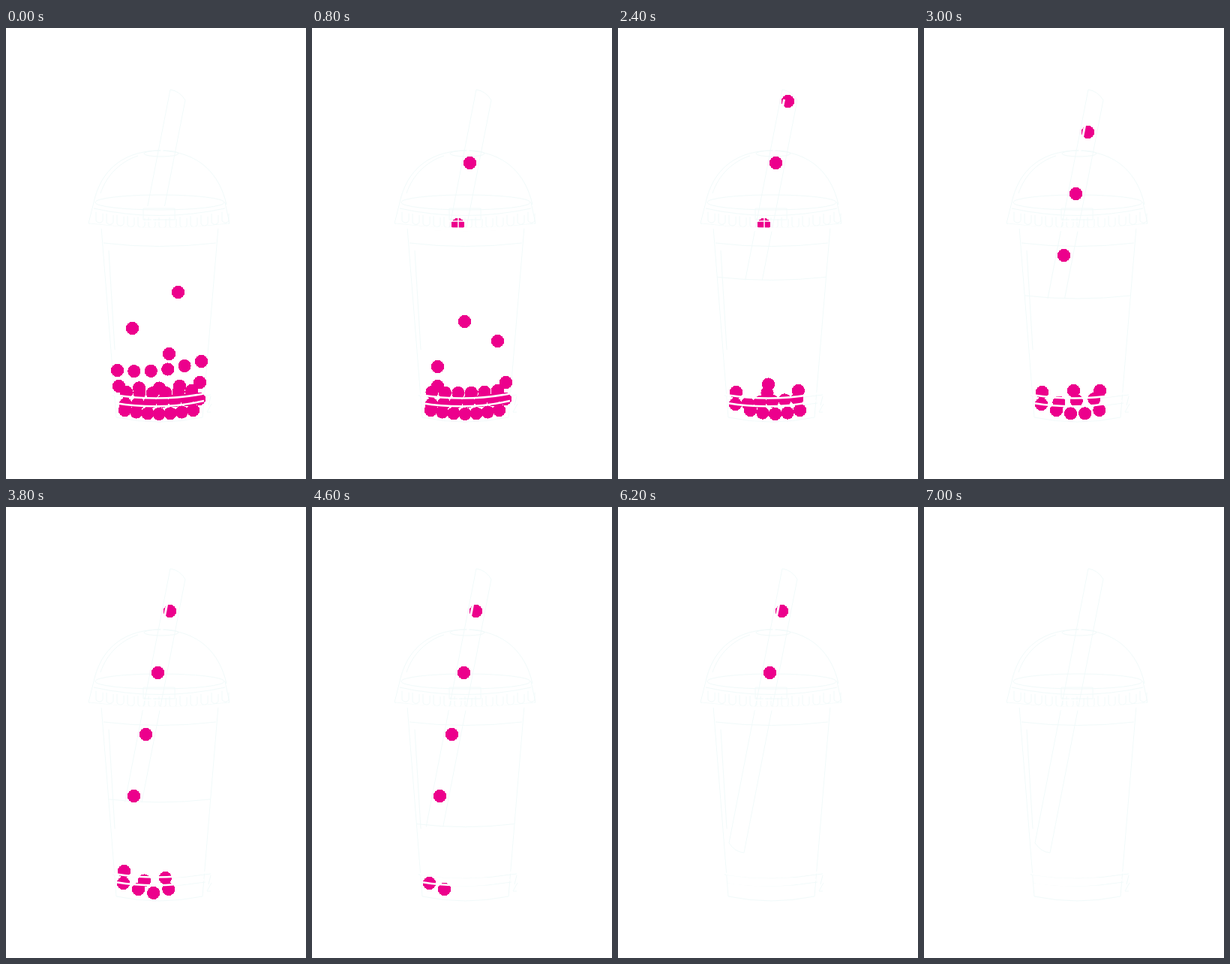
Write an HTML page that moves like this. It is 400 px wide and 600 px high and loops after 7.2 s.

```html
<!DOCTYPE html>
<html lang="en">
<head>
<meta charset="utf-8">
<title>Bubble tea</title>
<style>
  html, body { margin: 0; width: 100%; height: 100%; overflow: hidden; background: #fff; }
  svg { display: block; width: 400px; height: 600px; }
  .line { fill: none; stroke: #f1fafa; stroke-width: 1; }
  .gap { fill: none; stroke: #fff; stroke-width: 2.5; }
  .pearls { fill: #ec008c; shape-rendering: crispEdges; }
</style>
</head>
<body>
<svg viewBox="0 0 400 600">
  <clipPath id="above"><rect id="air" width="400" height="240"/></clipPath>

  <g class="line">
    <path clip-path="url(#above)" d="M219 82L148 447Q156 459 168 460L239 96Q232 84 219 82"/>
    <path id="surface"/>
    <path d="M117 232C125 195 150 164 204 163C258 164 285 195 294 235"/>
    <path d="M126 220C134 196 152 178 176 170"/>
    <ellipse cx="207" cy="167" rx="23" ry="4"/>
    <ellipse cx="205" cy="232" rx="86" ry="10"/>
    <path d="M117 232L110 260Q204 273 298 260L292 232"/>
    <path d="M117 240Q204 259 292 240M183 240H225V255H183Z"/>
    <path id="ridges"/>
    <path d="M127 265L147 518Q204 530 262 518L283 265"/>
    <path d="M130 286Q204 295 280 286M137 296L145 428"/>
    <path d="M142 489Q204 499 273 488M146 500Q204 509 266 499"/>
    <path d="M273 490L270 502M274 500L268 511H273"/>
  </g>

  <path id="pearls" class="pearls"/>

  <!-- gaps in front of the pearls -->
  <g class="gap">
    <path d="M221.5 95L207.5 165" stroke-width="3"/>
    <path d="M144 488Q207 498 266 486M146 499Q207 509 264 496"/>
    <path d="M195 252V266M184 257H205" stroke-width="1.5"/>
    <path d="M112 263Q204 273 296 263" stroke-width="5"/>
  </g>
</svg>

<script>
const LOOP = 7200, STEP = 200, R = 8.6, SIPS = 15;

// Rows of pearls, spread evenly from left to right. Each empties between
// two times, while its ends move in by the given amounts.
const rows = [
  { n: 7, left: 158, right: 249, y: 508, tilt: 0, sag: 5, from: 1200, to: 5000, inL: 18, inR: 70, bend: 2 },
  { n: 7, left: 159, right: 257, y: 500, tilt: -7, sag: 0, from: 1700, to: 4700, inL: -3, inR: 60, bend: 0.8 },
  { n: 6, left: 160, right: 247, y: 484, tilt: -2, sag: 2, from: 700, to: 3900, inL: -3, inR: 25, bend: 2 },
  { n: 5, left: 150, right: 258, y: 476, tilt: -5, sag: 5, from: 0, to: 1200, inL: 17, inR: 0, bend: 1 },
  { n: 6, left: 148, right: 260, y: 455, tilt: -12, sag: 6, from: 0, to: 700, inL: 0, inR: 0, bend: 1 }
];

// Loose pearls drift through these points.
const TIMES = [0, 800, 1800, 3000];
const loose = [
  [[229, 351], [203, 390], [201, 465], [199, 482]],
  [[168, 399], [167, 450]],
  [[217, 433], [247, 416]]
];

const $ = id => document.getElementById(id);
const mix = (a, b, u) => a + (b - a) * u;
const clamp = u => Math.min(1, Math.max(0, u));
const dot = (x, y) =>
  `M${x + 0.5 - R} ${y + 0.5}a${R} ${R} 0 1 1 ${2 * R} 0a${R} ${R} 0 1 1 ${-2 * R} 0z`;

$("ridges").setAttribute("d", Array.from({ length: 13 }, (_, i) => {
  const x = 120 + i * 14, y = 244 + 8 * (1 - ((x - 204) / 88) ** 2);
  return `M${x} ${y}v12q5 5 9 0v-10`;
}).join(""));

function drawRow(row, t) {
  const u = clamp((t - row.from) / (row.to - row.from));
  const count = Math.ceil(row.n * (1 - u));
  const left = row.left + row.inL * clamp(6 * u);
  const right = row.right - row.inR * u ** row.bend;
  let d = "";
  for (let i = 0; i < count; i++) {
    const v = i / Math.max(1, count - 1);
    d += dot(mix(left, right, v), row.y + row.tilt * v + row.sag * Math.sin(Math.PI * v));
  }
  return d;
}

function drawLoose(path, t) {
  const end = path.length - 1;
  if (t > TIMES[end] + STEP) return "";
  let k = 0;
  while (k < end - 1 && t >= TIMES[k + 1]) k++;
  const u = clamp((t - TIMES[k]) / (TIMES[k + 1] - TIMES[k]));
  const [a, b] = [path[k], path[k + 1]];
  return dot(mix(a[0], b[0], u), mix(a[1], b[1], u));
}

// Pearls follow each other up the straw and show above the drink.
function drawStraw(t, level) {
  let d = "";
  for (let k = 0; k < SIPS; k++) {
    const y = 138 + 0.205 * (1000 + 400 * k - t);
    if (y > 90 && y < level) d += dot(218 - (y - 138) * 0.195, y);
  }
  return d;
}

function draw(t) {
  const level = 235 + 0.041 * t;
  const left = 127 + (level - 265) * 0.078;
  const right = 283 - (level - 265) * 0.082;
  $("air").setAttribute("height", level + 2);
  $("surface").setAttribute("d", level > 267 && level < 487
    ? `M${left} ${level - 2}Q204 ${level + 6} ${right} ${level - 2}` : "");
  $("pearls").setAttribute("d", drawStraw(t, level)
    + rows.map(row => drawRow(row, t)).join("")
    + loose.map(path => drawLoose(path, t)).join(""));
}

let shown = -1;
function tick() {
  const t = Math.floor(performance.now() % LOOP / STEP) * STEP;
  if (t !== shown) draw(shown = t);
  requestAnimationFrame(tick);
}
tick();
</script>
</body>
</html>
```
